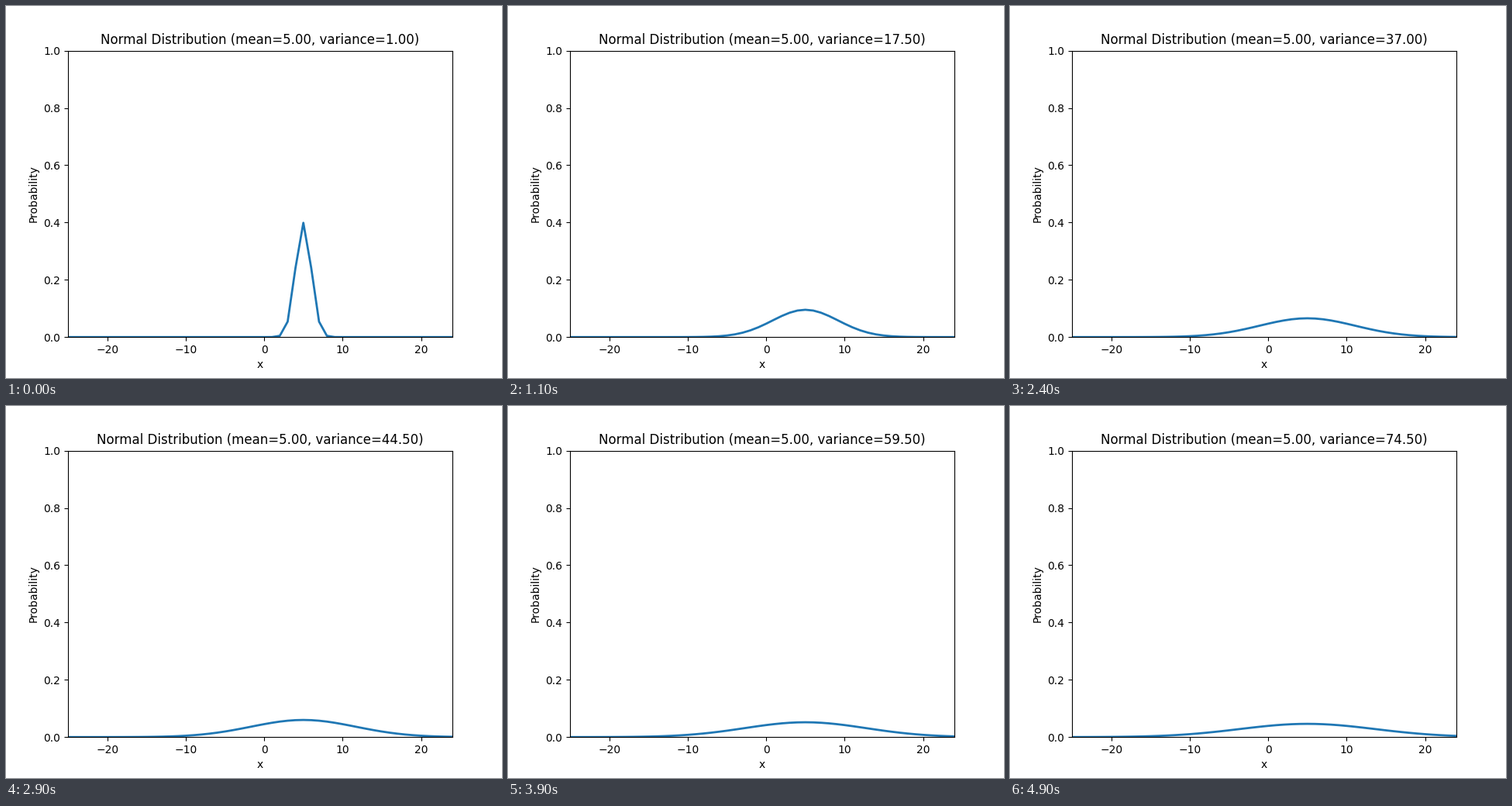
Animation, 640 px wide and 480 px high, one loop 5 s. Source, as a matplotlib script:

```python
import matplotlib.pyplot as plt
import numpy as np
from matplotlib.animation import FuncAnimation

FRAMES = 50
INTERVAL = 100
MEAN = 5.0
START_VARIANCE = 1.0
SLOW_RATE, FAST_RATE = 1.0, 1.5
FAST_FROM = 10

x = np.arange(-25, 25)


def variance_at(frame):
    rate = SLOW_RATE if frame < FAST_FROM else FAST_RATE
    return START_VARIANCE + rate * frame


def normal_pdf(values, mean, variance):
    scale = np.sqrt(2 * np.pi * variance)
    return np.exp(-(values - mean) ** 2 / (2 * variance)) / scale


fig, ax = plt.subplots(figsize=(6.4, 4.8), dpi=100)
ax.set_xlim(x[0], x[-1])
ax.set_ylim(0, 1)
ax.set_xlabel("x")
ax.set_ylabel("Probability")
line, = ax.plot([], [], lw=2, color="#1f77b4")
title = ax.set_title("")


def update(frame):
    variance = variance_at(frame)
    line.set_data(x, normal_pdf(x, MEAN, variance))
    title.set_text(
        f"Normal Distribution (mean={MEAN:.2f}, variance={variance:.2f})"
    )
    return line, title


animation = FuncAnimation(
    fig, update, frames=FRAMES, interval=INTERVAL, repeat=True, repeat_delay=0
)
plt.show()
```
